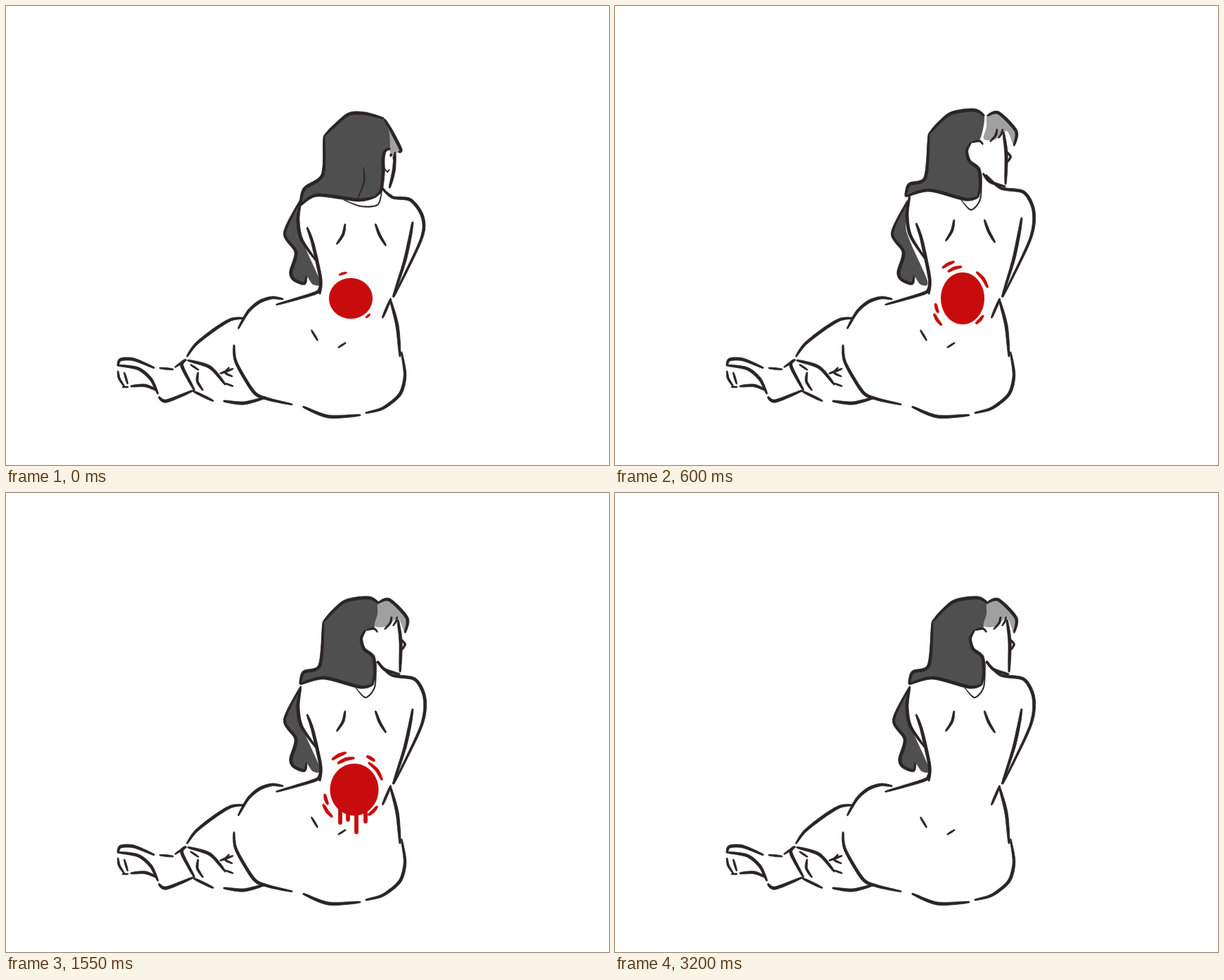
Recreate the animation shown at these times as an HTML page. Size 857 by 653 pixels, loop 3300 ms.

```html
<!DOCTYPE html>
<html lang="en">
<head>
<meta charset="utf-8">
<title>Back pain</title>
<style>
  html, body { margin: 0; width: 100%; height: 100%; overflow: hidden; background: #fff; }
  svg { display: block; width: 100vw; height: 100vh; }
</style>
</head>
<body>
<svg id="stage" viewBox="0 0 857 653"></svg>
<script>
const INK = '#2a2427', HAIR = '#4f4f4f', FRINGE = '#a0a0a0', RED = '#c80c0d';
const LOOP = 3300, STEP = 50, TENSION = .42;
const stage = document.getElementById('stage');
const mix = (a, b, u) => a + (b - a) * u;
const clamp = (v, lo = 0, hi = 1) => Math.max(lo, Math.min(hi, v));
const pts = s => s.split(', ').map(q => q.split(' ').map(Number));
const move = (p, dx, dy) => p.map(([x, y]) => [x + dx, y + dy]);
const blend = ([a, b], u) => a.map((q, i) => q.map((v, j) => mix(v, b[i][j], u)));
const outline = p => 'M' + p.map(q => q.map(v => v.toFixed(1)).join(' ')).join('L') + 'Z';

// Cardinal spline samples through a few key points
function curve(p, closed) {
  const n = p.length, out = [], k = 10;
  const at = i => closed ? p[(i + n) % n] : p[clamp(i, 0, n - 1)];
  for (let i = 0; i < (closed ? n : n - 1); i++) {
    const [a, b, c, d] = [-1, 0, 1, 2].map(j => at(i + j));
    for (let j = 0; j < k; j++) {
      const t = j / k, e = t * t * (3 - 2 * t);
      const m0 = TENSION * t * (1 - t) ** 2, m1 = TENSION * t * t * (t - 1);
      out.push([0, 1].map(q => mix(b[q], c[q], e) + m0 * (c[q] - a[q]) + m1 * (d[q] - b[q])));
    }
  }
  if (!closed) out.push(p[n - 1]);
  return out;
}

// Brush line: longer strokes are pressed harder, the ends taper
function brush(p, full) {
  const c = curve(p), n = c.length - 1, left = [], right = [];
  const length = c.reduce((s, q, i) => i ? s + Math.hypot(q[0] - c[i - 1][0], q[1] - c[i - 1][1]) : 0, 0);
  const width = full || clamp(1.6 + length / 18, 2, 4.2);
  c.forEach(([x, y], i) => {
    const a = c[Math.max(0, i - 1)], b = c[Math.min(n, i + 1)];
    const dx = b[0] - a[0], dy = b[1] - a[1], len = Math.hypot(dx, dy) || 1;
    const h = width / 2 * mix(.35, 1, Math.sin(Math.PI * i / n) ** .6);
    left.push([x - dy / len * h, y + dx / len * h]);
    right.unshift([x + dy / len * h, y - dx / len * h]);
  });
  return outline(left.concat(right));
}

function add(color, edge = 0) {
  const e = document.createElementNS('http://www.w3.org/2000/svg', 'path');
  for (const [k, v] of Object.entries({ fill: color, stroke: color, 'stroke-width': edge, 'stroke-linejoin': 'round' }))
    e.setAttribute(k, v);
  return stage.appendChild(e);
}
const draw = (e, d) => e.setAttribute('d', d);

// Hips, legs and feet
const body = [
  '447 392, 446 402, 438 409, 384 425',
  '394 417, 378 415, 360 421, 344 435, 330 459',
  '338 444, 320 446, 298 459, 270 481, 257 499',
  '159 511, 163 503, 182 503, 211 515',
  '218 515, 238 517',
  '240 514, 256 503',
  '158 511, 188 516, 206 531, 216 552',
  '217 556, 228 562, 266 547',
  '159 519, 161 530, 168 541',
  '168 521, 173 538',
  '165 542, 174 542',
  '177 541, 198 540, 215 547',
  '256 503, 250 512, 268 547',
  '258 504, 290 514, 312 539',
  '262 510, 274 518',
  '273 521, 272 534, 280 547',
  '304 523, 323 516',
  '317 514, 312 522, 322 527',
  '312 537, 323 541',
  '266 548, 295 562',
  '309 562, 338 565, 369 557',
  '324 482, 327 507, 352 549, 372 559, 407 567',
  '422 570, 458 584, 504 582',
  '511 579, 536 572, 560 552, 567 525, 562 492',
  '546 417, 556 455, 560 499',
  '547 416, 535 444',
  '434 461, 443 476',
  '472 486, 483 479'
].map(pts);

// Back and arms, lifted a little while she leans
const torso = [
  '578 307, 574 330, 566 365, 550 414',
  '419 275, 415 304, 420 332, 442 364',
  '428 315, 436 338, 447 388, 446 410',
  '482 310, 479 325, 470 339',
  '525 310, 531 326, 540 341'
].map(pts);
const tail = pts('418 277, 396 323, 412 350, 405 378, 409 389, 424 395, 427 384, 436 396, 446 391, 416 320');

// Head parts: looking away, then facing right
const pose = (a, b) => [pts(a), pts(b)];
const hair = pose(
  '452 185, 485 155, 510 153, 537 160, 547 180, 546 203, 539 206, 536 217, 536 238, 533 262, 524 272, 500 276, 442 269, 418 284, 424 260, 450 240',
  '451 183, 480 155, 515 149, 530 157, 524 190, 511 195, 505 207, 509 222, 522 233, 524 256, 521 273, 503 276, 452 263, 418 272, 423 255, 446 245');
const fringe = pose(
  '538 161, 549 180, 561 204, 558 208, 552 210, 549 212, 546 214, 545 182',
  '529 156, 545 152, 570 178, 567 199, 557 178, 540 190, 524 189, 528 172');
const features = [
  pose('553 208, 551 235, 545 259', '557 180, 561 212, 560 255'),
  pose('552 211, 551 215, 551 219', '559 206, 567 215, 562 224'),
  pose('547 210, 547 212, 546 214', '548 176, 546 185, 538 194'),
  pose('548 211, 548 212, 547 213', '556 176, 554 183, 550 189'),
  pose('546 204, 543 203, 540 206', '528 198, 523 193, 512 195'),
  pose('533 256, 540 265, 549 271', '528 239, 538 251, 560 258')
];
const shoulder = pose(
  '533 258, 549 272, 575 276, 592 300, 590 332, 551 414',
  '527 240, 548 259, 581 265, 595 292, 590 332, 551 414');
const collar = pose('480 276, 505 285, 529 282, 535 254', '497 277, 511 291, 524 276, 526 240');
const locks = ['508 230, 509 250, 500 273', '538 231, 542 236, 545 232'].map(pts);

// Arcs around the ball: time of birth, start and end angle, distance
const arcs = [
  [0, -124, -90, 8], [0, 60, 34, 5], [250, 172, 152, 8], [450, 156, 130, 14],
  [450, -61, -18, 7], [450, -128, -103, 17], [750, -69, -53, 14]
];
// Drips: x, first and last lower end, exponent of the fall
const drips = [[475, 466, 480, .5], [486, 462, 521, 1.3], [498, 472, 505, .5], [511, 464, 479, .5]];

const layers = {
  hair: add(HAIR), fringe: add(FRINGE), tail: add(HAIR), ink: add(INK, .8), thin: add(INK, .4),
  ball: add(RED), marks: add(RED, .8), drips: add(RED, .8)
};

function drawFigure(t) {
  const turn = clamp((t - 100) / 250), lean = Math.min(turn, clamp((750 - t) / 150));
  const head = set => move(blend(set, turn), -5 * lean, -lean);
  const h = head(hair), f = blend(fringe, turn), hang = move(tail, -2 * lean, 0);
  const run = (p, a, b) => Array.from({ length: b - a + 1 }, (_, i) => p[(a + i) % p.length]);
  const strokes = [
    ...body, ...torso.map(p => p.map(([x, y]) => [x, y - 6 * lean * clamp((400 - y) / 80)])),
    run(h, 0, 3), run(h, 13, 16), run(h, 10, 13), run(h, 5, 10),
    run(f, 0, 3), run(hang, 0, 6), ...features.map(head), blend(shoulder, turn)
  ];
  draw(layers.hair, outline(curve(h, true)));
  draw(layers.fringe, outline(curve(f, true)));
  draw(layers.tail, outline(curve(hang, true)));
  draw(layers.ink, strokes.map(p => brush(p)).join(''));
  draw(layers.thin, [head(collar), ...(turn < .3 ? locks : [])].map(p => brush(p, 1.8)).join(''));
}

function drawPain(t) {
  const on = t < 3200, round = t >= 1400;
  const grow = clamp(t / 750), swell = clamp((t - 100) / 250), tilt = swell * clamp((600 - t) / 250);
  const cx = mix(490, 495, grow), cy = round ? 422 : 416;
  const rx = round ? 34.5 : 31 - 3 * tilt, ry = mix(29, 37, swell);
  const spot = (deg, a, b, spin = 0) => {
    const r = deg * Math.PI / 180, x = a * Math.cos(r), y = b * Math.sin(r);
    return [cx + x * Math.cos(spin) - y * Math.sin(spin), cy + x * Math.sin(spin) + y * Math.cos(spin)];
  };
  const ring = Array.from({ length: 60 }, (_, i) => spot(i * 6, rx, ry, .45 * tilt));
  draw(layers.ball, on ? outline(ring) : '');

  const reach = mix(.5, 1, grow);
  draw(layers.marks, on ? arcs.filter(a => t >= a[0]).map(([, from, to, gap]) => {
    const line = [0, .5, 1].map(s => spot(mix(from, to, .5 + (s - .5) * reach), rx + gap, ry + gap));
    return brush(line, mix(3, 4.5, grow));
  }).join('') : '');

  // The drips run down in steps of 150 ms
  const u = t >= 2350 ? 1 : Math.floor((t - 1400) / 150) * 150 / 950;
  const falls = round ? drips.map(([x, a, b, p]) => [x, mix(a, b, u ** p)]) : t >= 1150 ? [[494, 461]] : [];
  draw(layers.drips, on ? falls.map(([x, y]) =>
    `M${x - 2.5} 448V${y - 2.5}a2.5 2.5 0 0 0 5 0V448Z`).join('') : '');
}

let last = -1;
const start = performance.now();
function tick() {
  const t = Math.floor((performance.now() - start) % LOOP / STEP) * STEP;
  if (t !== last) {
    last = t;
    drawFigure(t);
    drawPain(t);
  }
  requestAnimationFrame(tick);
}
tick();
</script>
</body>
</html>
```
